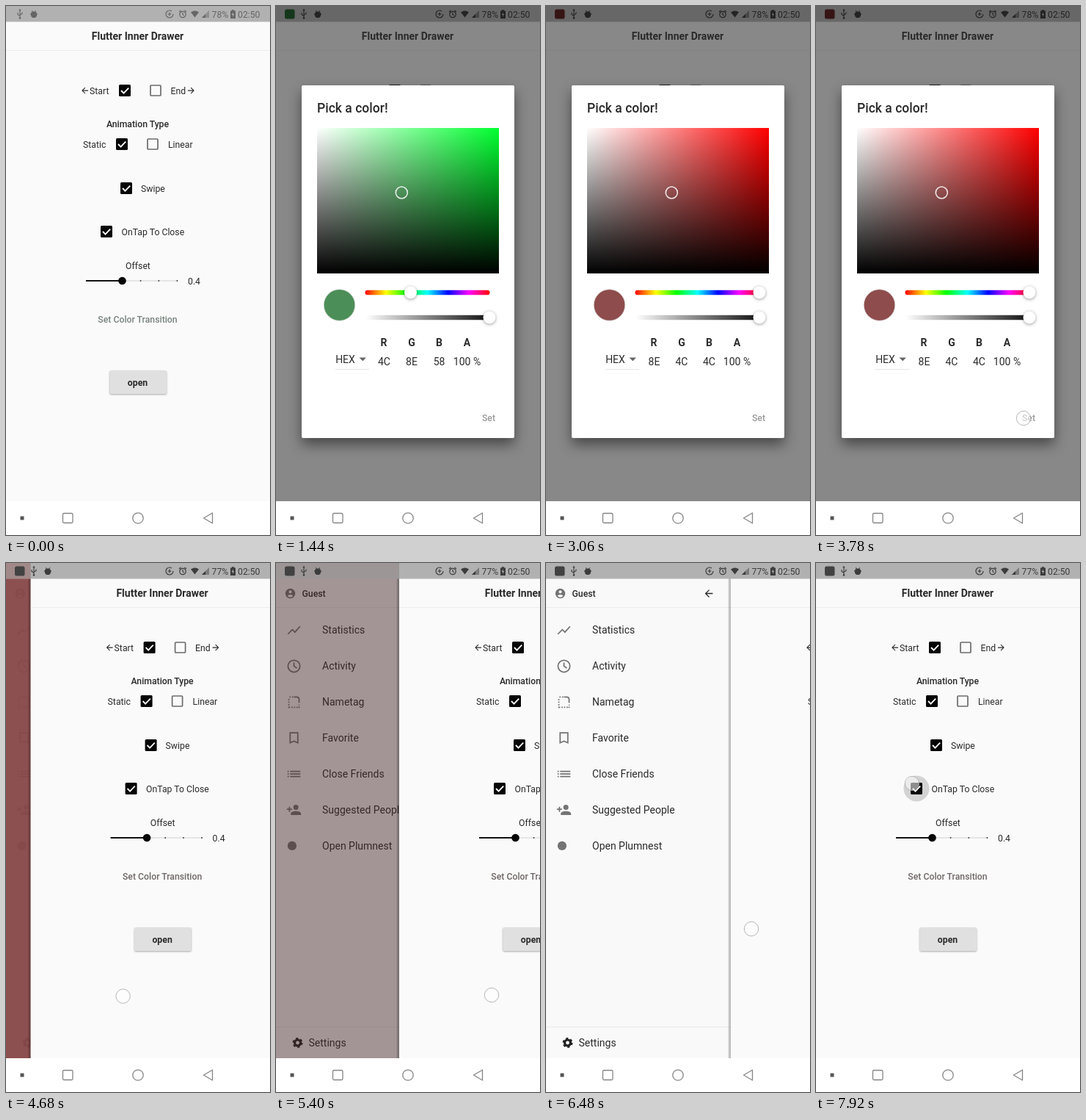
These frames come from a looping animation (360x720 px, 8 s). An HTML page:

```html
<!DOCTYPE html>
<html lang="en">
<head>
<meta charset="utf-8">
<title>Inner drawer demo</title>
<style>
html, body { margin: 0; width: 100%; height: 100%; overflow: hidden; background: #fff }
svg { display: block; width: 100vw; height: 100vh; font: 12.25px Roboto, sans-serif; fill: #2a2a2a }
.m { font-weight: 500 }
.b { font-weight: 700 }
.l { font-size: 14px }
.mid { text-anchor: middle }
.icon { fill: #747474 }
.line { fill: none; stroke: #747474; stroke-width: 2 }
#card { filter: drop-shadow(0 9px 9px #0007) }
.thumb { fill: #fff; filter: drop-shadow(0 1px 2px #0006) }
#open { filter: drop-shadow(0 1px 1px #0005) }
</style>
</head>
<body>
<svg viewBox="0 0 360 720">
  <defs>
    <linearGradient id="white"><stop stop-color="#fff"/><stop offset="1" stop-color="#fff" stop-opacity="0"/></linearGradient>
    <linearGradient id="black" x2="0" y2="1"><stop stop-opacity="0"/><stop offset="1"/></linearGradient>
    <linearGradient id="alpha"><stop stop-opacity="0"/><stop offset="1" stop-color="#111"/></linearGradient>
    <linearGradient id="edge"><stop stop-opacity="0"/><stop offset=".4" stop-opacity=".2"/><stop offset="1" stop-opacity=".26"/></linearGradient>
    <linearGradient id="rainbow"></linearGradient>
    <path id="back" d="M20 11H7.8l5.6-5.6L12 4l-8 8 8 8 1.4-1.4L7.8 13H20z"/>
    <g id="off"><rect x="-7" y="-7" width="14" height="14" rx="1" fill="none" stroke="#6b6b6b" stroke-width="1.7"/></g>
    <g id="on"><rect x="-8" y="-8" width="16" height="16" rx="1.5" fill="#050505"/><path d="M-5 0l3.5 3.6L5.2-3.4" fill="none" stroke="#fff" stroke-width="1.8"/></g>
  </defs>

  <g id="drawer">
    <rect width="360" height="674" fill="#f9f9f9"/>
    <path d="M0 60.5H360M0 631.5H360" stroke="#ebebeb"/>
    <circle cx="19.5" cy="41.5" r="6.7" class="icon"/>
    <circle cx="19.5" cy="39.3" r="2" fill="#f9f9f9"/>
    <path d="M15.5 44.6q4-3 8 0q-4 4.5-8 0" fill="#f9f9f9"/>
    <text x="35.5" y="46" class="m">Guest</text>
    <use href="#back" transform="translate(214 33.5) scale(.67)"/>
    <g id="menu" class="l"></g>
    <circle cx="29.5" cy="653" r="4" fill="none" stroke="#222" stroke-width="3.2"/>
    <circle cx="29.5" cy="653" r="6" fill="none" stroke="#222" stroke-width="2" stroke-dasharray="3.14"/>
    <text x="44.5" y="658" class="l">Settings</text>
  </g>
  <rect id="tint" width="360" height="674"/>

  <g id="main">
    <rect x="-4" width="4" height="674" fill="url(#edge)"/>
    <rect width="360" height="674" fill="#fafafa"/>
    <path d="M0 60.5H360" stroke="#ececec"/>
    <text x="179.5" y="46" class="b l mid" textLength="">Flutter Inner Drawer</text>
    <use href="#back" transform="translate(101 108.5) scale(.55)"/>
    <text x="114" y="119.5">Start</text>
    <use href="#on" x="162" y="115"/>
    <use href="#off" x="204" y="115"/>
    <text x="224.5" y="119.5">End</text>
    <use href="#back" transform="translate(259 108.5) scale(-.55 .55)"/>
    <text x="179.5" y="165" class="m mid">Animation Type</text>
    <text x="105" y="193">Static</text>
    <use href="#on" x="158" y="188"/>
    <use href="#off" x="200" y="188"/>
    <text x="221" y="193">Linear</text>
    <use href="#on" x="164" y="248"/>
    <text x="184" y="252.5">Swipe</text>
    <circle id="ripple" cx="137" cy="307" r="17.5" fill="#d3d3d3"/>
    <use href="#on" x="137" y="307"/>
    <text x="157.5" y="312">OnTap To Close</text>
    <text x="180" y="357.5" class="mid">Offset</text>
    <path d="M158 374H235" stroke="#dedede" stroke-width="1.6"/>
    <path d="M109 374H158" stroke="#111" stroke-width="1.8"/>
    <path d="M182.8 374h1.6M207.6 374h1.6M232.6 374h1.6" stroke="#222" stroke-width="1.6"/>
    <circle cx="158.5" cy="374" r="5.3" fill="#050505"/>
    <text x="248" y="378.5">0.4</text>
    <text id="setColor" x="179.5" y="431" class="m mid">Set Color Transition</text>
    <rect id="open" x="141.5" y="496" width="77.5" height="32" rx="2" fill="#e0e0e0"/>
    <text x="179.5" y="516.5" class="b mid">open</text>
  </g>

  <rect width="360" height="21.5" fill="#b1b1b1"/>
  <rect id="barTint" width="360" height="21.5"/>

  <g id="dialog">
    <rect width="360" height="674" opacity=".54"/>
    <rect id="card" x="35" y="108" width="290" height="480" rx="2" fill="#fff"/>
    <text x="56" y="145" class="m" style="font-size:17.5px">Pick a color!</text>
    <rect id="field" x="56" y="166" width="248" height="198"/>
    <rect x="56" y="166" width="248" height="198" fill="url(#white)"/>
    <rect x="56" y="166" width="248" height="198" fill="url(#black)"/>
    <circle cx="171.3" cy="254" r="8" fill="none" stroke="#fff" stroke-opacity=".85" stroke-width="1.6"/>
    <circle id="swatch" cx="86.5" cy="407" r="21.3" stroke="#ddd" stroke-width=".7"/>
    <rect x="121.5" y="386.7" width="170" height="6.6" rx="3.3" fill="url(#rainbow)"/>
    <rect x="122" y="420.7" width="170" height="6.6" rx="3.3" fill="url(#alpha)"/>
    <circle id="hue" cy="390" r="8.5" class="thumb"/>
    <circle cx="291" cy="424" r="8.5" class="thumb"/>
    <g class="l mid">
      <g class="b"><text x="147" y="463">R</text><text x="185" y="463">G</text><text x="222.5" y="463">B</text><text x="260.5" y="463">A</text></g>
      <text x="94.5" y="486">HEX</text>
      <text id="r" x="147.5" y="489"></text><text id="g" x="185" y="489"></text><text id="b" x="222.5" y="489"></text>
      <text x="260.5" y="489">100 %</text>
    </g>
    <path d="M113.5 478.5h9.5l-4.7 4.7z" fill="#666"/>
    <path d="M81 494.5H127" stroke="#e6e6e6"/>
    <text x="290" y="565" class="m mid" style="fill:#999">Set</text>
  </g>

  <g id="status">
    <rect id="app" x="12" y="4.5" width="13.5" height="13" rx="2.5"/>
    <g id="left">
      <path d="M38 5v12M35 9v2.5l3 2M41 8.500v2l-3 2" fill="none" stroke="currentColor" stroke-width="1.1"/>
      <path d="M38 3.800l1.700 2.500h-3.400z"/><circle cx="38" cy="16.500" r="1.300"/>
      <path d="M54.500 6l1 1.500h3l1-1.500.7.6-.8 1.400 1.600 1.500v1h1v1.200h-1v2l-2 2.200h-4l-2-2.200v-2h-1v-1.200h1v-1l1.600-1.500-.8-1.400z"/>
    </g>
    <g fill="none" stroke="currentColor" stroke-width="1.2">
      <circle cx="223" cy="11" r="5" stroke-dasharray="26 5.4"/><path d="M220.500 11h5M223 8.500v5"/>
      <circle cx="241" cy="11.500" r="4.200"/><path d="M241 9v2.700l1.800 1M236 8l2.500-2M246 8l-2.500-2"/>
    </g>
    <path d="M252 8.500q5.500-4 11 0l-5.500 7z"/>
    <path d="M277 6v10h-10z" opacity=".45"/><path d="M272 11v5h-5z"/>
    <path d="M306 6.500h2v-1.300h3v1.300h2v10.500h-7zM309.700 8.500l-2 3.500h1.500v2.700l2-3.700h-1.500z" fill-rule="evenodd"/>
    <text id="battery" x="280.500" y="15.500"></text>
    <text x="316" y="15.500">02:50</text>
  </g>

  <rect y="674" width="360" height="46" fill="#fff"/>
  <rect x="19.500" y="694.500" width="5" height="5" fill="#555"/>
  <g fill="none" stroke="#858585" stroke-width="1.300">
    <rect x="77.500" y="690.500" width="13.500" height="13" rx="1.500"/>
    <circle cx="180" cy="697" r="7.200"/>
    <path d="M281.500 690v14l-12-7z" stroke-linejoin="round"/>
  </g>
  <circle id="touch" r="9.700" fill="#fff" fill-opacity=".55" stroke="#a5a5a5" stroke-opacity=".8"/>
</svg>
<script>
const $ = id => document.getElementById(id);
const set = (id, attrs) => { for (const k in attrs) $(id).setAttribute(k, attrs[k]); };
const show = (id, on) => set(id, { visibility: on ? 'visible' : 'hidden' });

const items = [
  ['Statistics', '<path class="line" d="M2.500 18l7-7 4 4L21.500 6"/>'],
  ['Activity', '<circle class="line" cx="12" cy="12" r="9.300"/><path class="line" d="M12 6.500V12l4.500 3"/>'],
  ['Nametag', '<path class="line" stroke-dasharray="2" d="M11 4H3M4 7v14M4 20h17M20 21v-5"/><path class="line" d="M12 4h4q4 0 4 4v5"/>'],
  ['Favorite', '<path class="line" d="M6 4h12v15.500l-6-2.600-6 2.600z"/>'],
  ['Close Friends', '<path class="line" d="M2 8h2M2 12h2M2 16h2M6 8h16M6 12h16M6 16h16"/>'],
  ['Suggested People', '<circle class="icon" cx="15" cy="8" r="4"/><path class="icon" d="M7 20v-2c0-5.300 16-5.300 16 0v2z"/><path class="line" d="M1 11h8M5 7v8"/>'],
  ['Open Plumnest', '<circle class="icon" cx="9" cy="12" r="7"/>']
];
$('menu').innerHTML = items.map(([name, icon], i) => {
  const y = 91.500 + i * 48.900;
  return `<g transform="translate(14 ${y - 10.500}) scale(.875)">${icon}</g><text x="63" y="${y + 4.700}">${name}</text>`;
}).join('');
$('rainbow').innerHTML = [0, 60, 120, 180, 240, 300, 360]
  .map(h => `<stop offset="${h / 360}" stop-color="hsl(${h} 100% 50%)"/>`).join('');

// Piecewise linear track: keys are [time, value]
function track(keys, t) {
  if (t <= keys[0][0]) return keys[0][1];
  for (let i = 1; i < keys.length; i++) {
    const [a, u] = keys[i - 1], [b, v] = keys[i];
    if (t <= b) return u + (v - u) * (t - a) / (b - a);
  }
  return keys.at(-1)[1];
}

// Each gesture is a list of [time, x, y]
const gestures = [
  [[720, 184, 430], [1080, 182, 427]],
  [[1620, 190, 400], [2340, 261, 401], [2700, 297, 402], [2880, 297, 402]],
  [[3600, 283, 561], [3780, 283, 561]],
  [[4500, 126, 590], [5400, 294, 588], [5580, 328, 586]],
  [[6300, 280, 498], [6480, 280, 498], [7380, 48, 500]],
  [[7740, 131, 300], [7999, 131, 300]]
];
const hueKeys = [[1620, 131], [2340, 280], [2700, 360]];
const slideKeys = [[4500, 0], [5400, 168], [5760, 252], [6480, 252], [7380, 20], [7560, 0]];
const dialogKeys = [[1080, 0], [1440, 1], [3780, 1], [4140, 0]];

// Hue at the picker's fixed saturation and value
function rgb(h) {
  const hi = 142, lo = 76;
  return [5, 3, 1].map(n => {
    const k = (n + h / 60) % 6;
    return Math.round(hi - (hi - lo) * Math.max(0, Math.min(k, 4 - k, 1)));
  });
}

function draw(now) {
  const t = Math.floor(now % 8000 / 180) * 180;
  const hue = track(hueKeys, t), color = rgb(hue);
  const fill = `rgb(${color})`;

  set('field', { fill: `hsl(${hue} 100% 50%)` });
  set('swatch', { fill });
  set('hue', { cx: 122 + hue / 360 * 169 });
  ['r', 'g', 'b'].forEach((id, i) => $(id).textContent = color[i].toString(16).toUpperCase());
  const dim = track(dialogKeys, t);
  set('dialog', { opacity: dim });

  const x = track(slideKeys, t);
  const a = 1 - (x / 252) ** 1.570;
  const shade = `rgb(${color.map(c => Math.round(c * a))})`;
  set('main', { transform: `translate(${x})` });
  set('tint', { fill: shade, opacity: a });
  set('barTint', { width: x, fill: shade, opacity: a * .4 });
  set('setColor', { style: `fill:${t < 1260 ? '#78847d' : '#6f6767'}` });

  const late = t >= 1260;
  const ink = late ? dim > .5 ? '#242424' : '#3c3c3c' : '#666';
  set('status', { style: `fill:${ink};color:${ink}` });
  set('left', { transform: `translate(${late ? 0 : -19})` });
  set('app', { style: `fill:${dim > .5 ? `hsl(${hue} 45% 15%)` : '#424242'}` });
  show('app', late);
  $('battery').textContent = t < 3960 ? '78%' : '77%';

  const g = gestures.find(k => t >= k[0][0] && t <= k.at(-1)[0]);
  show('touch', g);
  if (g) set('touch', {
    cx: track(g.map(k => [k[0], k[1]]), t),
    cy: track(g.map(k => [k[0], k[2]]), t)
  });
  show('ripple', t >= 7920);
}

const start = performance.now();
function loop() {
  draw(performance.now() - start);
  requestAnimationFrame(loop);
}
loop();
</script>
</body>
</html>
```
